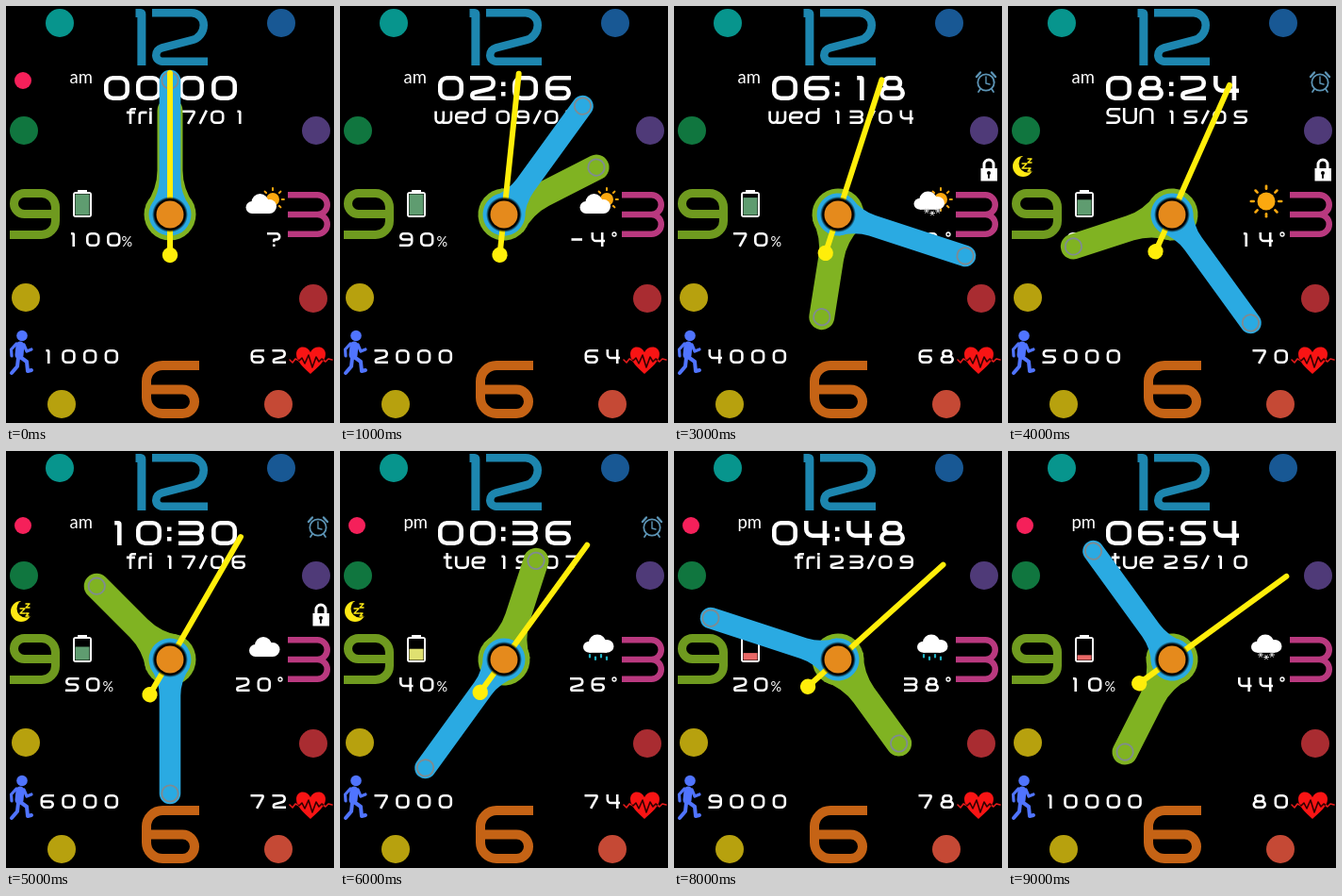
Write an HTML page with a canvas that moves like this. It is 348x442 px and loops after 10000 ms.

```html
<!DOCTYPE html>
<html lang="en">
<head>
<meta charset="utf-8">
<title>Watch face</title>
<style>
  html, body { margin: 0; width: 100%; height: 100%; overflow: hidden; background: #000; }
  canvas { display: block; }
</style>
</head>
<body>
<canvas id="face" width="348" height="442"></canvas>
<script>
const ctx = document.getElementById('face').getContext('2d');
const TAU = Math.PI * 2, CX = 174, CY = 221;
const WHITE = '#fff', YELLOW = '#ffee0a';

// Numerals and day letters: corner points "xy" on a 0-8 grid, rounded when drawn; z closes a loop.
const GLYPHS = {
  0: ['00 80 88 08 z'],
  1: ['40 50 58'],
  2: ['00 80 84 06 08 88'],
  3: ['00 80 84 04', '04 84 88 08'],
  4: ['00 05 85', '70 78'],
  5: ['80 00 04 84 88 08'],
  6: ['80 00 08 88 84 04'],
  7: ['00 80 81 48'],
  8: ['10 70 74 14 z', '04 84 88 08 z'],
  9: ['08 88 80 00 04 84'],
  '?': ['00 80 84 44 45', '48 48'],
  '-': ['14 74'],
  '/': ['60 28'],
  S: ['80 00 04 84 88 08'],
  U: ['00 08 88 80'],
  N: ['08 00 80 88'],
  f: ['80 30 38', '02 72'],
  r: ['08 02 82'],
  i: ['00 00', '02 08'],
  t: ['30 38 88', '02 72'],
  u: ['02 08 88 82'],
  e: ['05 85 82 02 08 78'],
  w: ['02 08 48 42', '48 88 82'],
  d: ['80 88 08 02 82']
};
const LETTER_WIDTH = { f: 10, r: 9, i: 2.4, t: 9.5, w: 19 };

function roundedLine(points, closed, cut) {
  const n = points.length;
  const at = i => points[(i + n) % n];
  const first = points[0], last = points[n - 1];
  if (closed) ctx.moveTo((first[0] + last[0]) / 2, (first[1] + last[1]) / 2);
  else ctx.moveTo(...first);
  for (let i = closed ? 0 : 1; i < (closed ? n : n - 1); i++) {
    const [x, y] = at(i), [px, py] = at(i - 1), [nx, ny] = at(i + 1);
    const ax = px - x, ay = py - y, bx = nx - x, by = ny - y;
    const la = Math.hypot(ax, ay), lb = Math.hypot(bx, by);
    const angle = Math.acos((ax * bx + ay * by) / (la * lb));
    ctx.arcTo(x, y, nx, ny, Math.min(cut, la / 2, lb / 2) * Math.tan(angle / 2));
  }
  if (closed) ctx.closePath(); else ctx.lineTo(...last);
}

function glyph(ch, x, y, w, h, line, color = WHITE) {
  ctx.strokeStyle = color;
  ctx.lineWidth = line;
  ctx.lineCap = 'square';
  ctx.beginPath();
  for (const path of GLYPHS[ch]) {
    const parts = path.split(' ');
    const closed = parts.at(-1) === 'z';
    if (closed) parts.pop();
    const points = parts.map(([px, py]) =>
      [x + line / 2 + px / 8 * (w - line), y + line / 2 + py / 8 * (h - line)]);
    roundedLine(points, closed, Math.min(w, h) * 0.28);
  }
  ctx.stroke();
}

const number = (value, x, y, pitch) =>
  [...String(value)].forEach((ch, i) => glyph(ch, x + i * pitch, y, 14.5, 15, 2.6));

function disc(x, y, r, color) {
  ctx.fillStyle = color;
  ctx.beginPath();
  ctx.arc(x, y, r, 0, TAU);
  ctx.fill();
}

function stroke(points, width, color, cap = 'round') {
  ctx.strokeStyle = color;
  ctx.lineWidth = width;
  ctx.lineCap = cap;
  ctx.lineJoin = 'round';
  ctx.beginPath();
  points.forEach(p => ctx.lineTo(...p));
  ctx.stroke();
}

function label(text, x, y, size, color = WHITE) {
  ctx.font = `${size}px Lato, sans-serif`;
  ctx.fillStyle = color;
  ctx.fillText(text, x, y);
}

function dial() {
  ctx.fillStyle = '#000';
  ctx.fillRect(0, 0, 348, 442);
  disc(57, 18, 15, '#07958d');
  disc(292, 18, 15, '#185894');
  disc(19, 132, 15, '#10763f');
  disc(329, 132, 15, '#4f3a78');
  disc(21, 309, 15, '#b7a10e');
  disc(326, 310, 15, '#a92c31');
  disc(59, 422, 15, '#b7a10e');
  disc(289, 422, 15, '#c54935');
  glyph(1, 130, 3, 24, 60, 9, '#1d86af');
  glyph(2, 155, 3, 59, 60, 8.5, '#1d86af');
  glyph(3, 299, 197, 45, 48, 6.5, '#b9397f');
  glyph(6, 144, 376, 61, 61, 10, '#c56315');
  glyph(9, 4, 194, 53, 53, 9, '#6f9a1f');
}

function day(name) {
  let x = 154.5;
  for (const ch of [...name].reverse()) {
    const w = LETTER_WIDTH[ch] || 15;
    x -= w;
    glyph(ch, x, 108, w, 17, 2.6);
    x -= 2.6;
  }
}

function battery(level) {
  ctx.fillStyle = WHITE;
  ctx.fillRect(76, 195, 10, 3);
  ctx.beginPath();
  ctx.roundRect(71, 197, 20, 27, 3);
  ctx.fill();
  ctx.fillStyle = '#000';
  ctx.fillRect(73, 199, 16, 23);
  const height = Math.min(22, 3 + 0.22 * level);
  ctx.fillStyle = level > 40 ? '#5f9c70' : level > 20 ? '#dfe070' : '#e96866';
  ctx.fillRect(73.5, 221.5 - height, 15, height);
}

function sun(x, y, r) {
  disc(x, y, r, '#fba80f');
  for (let i = 0; i < 8; i++) {
    const c = Math.cos(i * TAU / 8), s = Math.sin(i * TAU / 8);
    stroke([[x + c * r * 1.4, y + s * r * 1.4], [x + c * r * 1.7, y + s * r * 1.7]], r / 3.5, '#fba80f');
  }
}

function cloud(x, y, squash) {
  ctx.save();
  ctx.translate(x, y);
  ctx.scale(1, squash);
  disc(6.5, 14.5, 6.5, WHITE);
  disc(15, 9, 9, WHITE);
  disc(25, 13.5, 7.5, WHITE);
  ctx.fillRect(6.5, 11, 18.5, 10);
  ctx.restore();
}

function weather(kind) {
  const fall = ['', 'rain', 'snow', '', '', 'rain', 'snow', 'rain', 'snow'][kind];
  if (kind === 3) return sun(274, 207, 9.5);
  const sunny = kind < 3;
  if (sunny) sun(283, 205, 7);
  cloud(sunny ? 254.5 : 258, fall ? 194.5 + sunny * 2 : 197 + sunny * 2, fall ? 0.92 : 1);
  if (!fall) return;
  for (let i = 0; i < 4; i++) {
    const x = 265 + i * 6, y = 216 + i % 2 * 2.5 + sunny;
    if (fall === 'rain') stroke([[x, y], [x, y + 2.5]], 2.2, '#20b3c5');
    else if (i < 3) for (let a = 0; a < 3; a++) {
      const c = 2.6 * Math.cos(a * TAU / 6), s = 2.6 * Math.sin(a * TAU / 6);
      stroke([[x + 3 - c, y - s], [x + 3 + c, y + s]], 1, '#dadada');
    }
  }
}

function runner() {
  const blue = '#5074ff';
  disc(17, 349.5, 5.8, blue);
  stroke([[15, 360], [14, 370]], 9, blue);
  stroke([[11, 358], [5.5, 364], [6, 371]], 3.2, blue);
  stroke([[19, 359], [22, 366], [27, 364]], 3.2, blue);
  stroke([[15, 372], [22, 377], [23, 387], [27, 386]], 4, blue);
  stroke([[13, 373], [12, 382], [6, 389]], 4, blue);
}

function heart() {
  const pulse = [[301, 375], [304, 378], [307, 374], [311, 376], [314, 373], [317, 379], [321, 370],
    [325, 383], [329, 372], [332, 377], [335, 374], [339, 377], [342, 374], [346, 375]];
  const shape = new Path2D('M323 390 C316 383 308 377 308 369 C308 360 319 359 323 367 C327 359 339 360 339 369 C339 377 330 383 323 390Z');
  stroke(pulse, 1.6, '#e51c1c');
  ctx.fillStyle = '#f91414';
  ctx.fill(shape);
  ctx.save();
  ctx.clip(shape);
  stroke(pulse, 1.6, '#300');
  ctx.restore();
}

function moon() {
  disc(16, 170, 11, '#ffe914');
  disc(21, 167, 9.5, '#000');
  for (const [x, y, s] of [[15, 167, 5], [21, 162, 4], [21, 172, 3]])
    stroke([[x, y], [x + s, y], [x, y + s], [x + s, y + s]], 1.4, '#ffe914');
}

function alarm() {
  const steel = '#5c94b5';
  ctx.strokeStyle = steel;
  ctx.lineWidth = 1.8;
  ctx.beginPath();
  ctx.arc(331, 81, 8.7, 0, TAU);
  ctx.stroke();
  stroke([[331, 75], [331, 82], [335, 83]], 1.4, steel);
  for (const side of [-1, 1]) {
    stroke([[331 + side * 10, 75], [331 + side * 6, 70.5]], 2.4, steel);
    stroke([[331 + side * 6, 88], [331 + side * 8, 91]], 1.8, steel);
  }
}

function lock() {
  ctx.strokeStyle = WHITE;
  ctx.lineWidth = 3;
  ctx.beginPath();
  ctx.arc(334, 168, 5, Math.PI, 0);
  ctx.lineTo(339, 174);
  ctx.moveTo(329, 174);
  ctx.lineTo(329, 168);
  ctx.stroke();
  ctx.fillStyle = WHITE;
  ctx.fillRect(325.5, 172, 17.5, 13.5);
  disc(334, 177, 2, '#000');
  stroke([[334, 177], [334, 182]], 1.8, '#000');
}

function turned(turns, draw) {
  ctx.save();
  ctx.translate(CX, CY);
  ctx.rotate(turns * TAU);
  draw();
  ctx.restore();
}

function hand(turns, length, half, hub, color) {
  turned(turns, () => {
    disc(0, 0, hub, color);
    ctx.beginPath();
    ctx.moveTo(-hub * 0.94, -hub * 0.35);
    ctx.quadraticCurveTo(-half, -hub, -half, -hub * 1.7);
    ctx.lineTo(-half, -length);
    ctx.arc(0, -length, half, Math.PI, 0);
    ctx.lineTo(half, -hub * 1.7);
    ctx.quadraticCurveTo(half, -hub, hub * 0.94, -hub * 0.35);
    ctx.fill();
    ctx.strokeStyle = '#7f8b91';
    ctx.lineWidth = 1.8;
    ctx.beginPath();
    ctx.arc(0, -length, 8.7, 0, TAU);
    ctx.stroke();
  });
}

function hands(hours, minutes, seconds) {
  hand((hours + minutes / 60) / 12, 110, 13.5, 27.5, '#80b322');
  hand(minutes / 60, 142, 11.3, 22.5, '#2aaae2');
  turned(seconds / 60, () => {
    stroke([[0, -150], [0, 43]], 6, YELLOW);
    disc(0, 43, 8.2, YELLOW);
  });
  const shade = ctx.createRadialGradient(CX, CY, 14, CX, CY, 19);
  shade.addColorStop(0, '#000');
  shade.addColorStop(0.45, '#000');
  shade.addColorStop(1, 'rgba(0,0,0,0)');
  disc(CX, CY, 19, shade);
  disc(CX, CY, 14.5, '#e58a1c');
}

const two = n => String(n).padStart(2, '0');
const DAYS = ['SUN', 'mon', 'tue', 'wed', 'thu', 'fri', 'sat'];

function draw(step) {
  const hours = step * 2, minutes = step * 6;
  const date = 7 + step * 2, month = 1 + step;
  const level = 100 - step * 10;
  dial();

  [...two(hours % 12) + two(minutes)].forEach((ch, i) =>
    glyph(ch, [104, 138, 183, 218][i], 74, 27, 26, 4.6));
  ctx.fillStyle = WHITE;
  ctx.fillRect(171, 80.5, 4.5, 4.5);
  ctx.fillRect(171, 91, 4.5, 4.5);
  label(hours < 12 ? 'am' : 'pm', 67.5, 82, 18.5);

  day(DAYS[new Date(2022, month - 1, date).getDay()]);
  [...two(date) + '/' + two(month)].forEach((ch, i) =>
    glyph(ch, [165.5, 186.5, 202, 217, 239.5][i], 110.5, 14.5, 14.5, 2.6));

  battery(level);
  number(level, 63, 240, 22);
  label('%', 62.5 + 20 * String(level).length, 254.5, 14.5);

  weather(Math.max(step - 1, 0));
  if (step === 0) number('?', 277, 240, 22);
  else {
    const degrees = String(step * 6 - 10);
    number(degrees, 289 - 22.5 * degrees.length, 240, 22.5);
    ctx.lineWidth = 1.3;
    ctx.beginPath();
    ctx.arc(291, 242, 2, 0, TAU);
    ctx.stroke();
  }

  runner();
  number((step + 1) * 1000, 36.5, 364, 22.7);
  heart();
  number(62 + step * 2, 259.5, 364, 23);

  if (step === 0 || step >= 5) disc(18, 79, 9, '#f5205a');
  if (step >= 4 && step <= 7) moon();
  if (step >= 3 && step <= 6) alarm();
  if (step >= 2 && step <= 5) lock();
  hands(hours, minutes, step);
}

function frame() {
  draw(Math.floor(performance.now() / 1000) % 10);
  requestAnimationFrame(frame);
}
frame();
</script>
</body>
</html>
```
